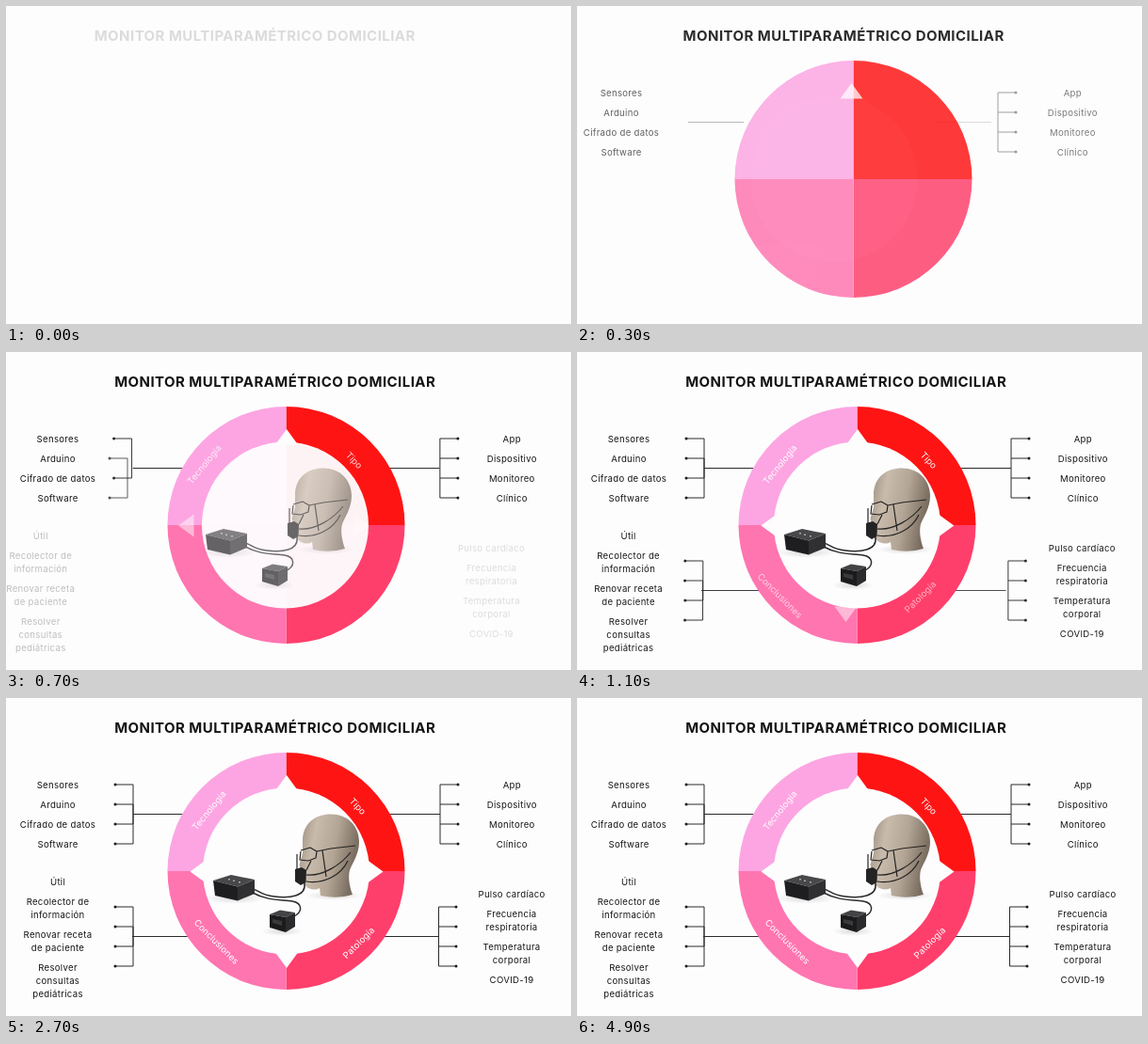
An HTML page that plays this animation: 600 px wide and 338 px high, repeating every 5000 ms.

```html
<!DOCTYPE html>
<html lang="es">
<head>
<meta charset="utf-8">
<title>Monitor multiparamétrico domiciliar</title>
<style>
  html, body { margin: 0; width: 100%; height: 100%; overflow: hidden; background: #fefdfe; }
  svg { display: block; width: 600px; height: 338px; }
  text { font: 9.6px Inter, "Open Sans", sans-serif; letter-spacing: .3px; text-anchor: middle; fill: #161616; }
  .title { font: 700 15px Inter, Roboto, sans-serif; letter-spacing: .44px; fill: #141414; }
  .label { fill: #fff; letter-spacing: .1px; }
  .wire { fill: none; stroke: #2b2b2b; stroke-width: 1; }
  .tube { fill: none; stroke: #2a2a2c; stroke-width: 1.5; stroke-linecap: round; }
  .strap { fill: none; stroke: #242322; stroke-width: 1.2; stroke-linejoin: round; }
  .white { fill: #fefdfe; }
</style>
</head>
<body>
<svg id="stage" viewBox="0 0 600 338">
  <defs>
    <linearGradient id="skin" x1="0" x2="1" y1="0" y2=".25">
      <stop offset="0" stop-color="#968a7b"/>
      <stop offset=".3" stop-color="#c8bbac"/>
      <stop offset=".65" stop-color="#b3a595"/>
      <stop offset="1" stop-color="#796d60"/>
    </linearGradient>
    <radialGradient id="shade">
      <stop offset="0" stop-color="#8a8a8c" stop-opacity=".3"/>
      <stop offset="1" stop-color="#8a8a8c" stop-opacity="0"/>
    </radialGradient>
  </defs>

  <g data-start="-31"><text class="title" x="285.7" y="37">MONITOR MULTIPARAMÉTRICO DOMICILIAR</text></g>

  <g id="wires"></g>

  <g data-start="17">
    <path fill="#ff1414" d="M297.5 184V58A126 126 0 0 1 423.5 184Z"/>
    <path fill="#ff3f6b" d="M297.5 184H423.5A126 126 0 0 1 297.5 310Z"/>
    <path fill="#ff75b0" d="M297.5 184V310A126 126 0 0 1 171.5 184Z"/>
    <path fill="#fca5e2" d="M297.5 184H171.5A126 126 0 0 1 297.5 58Z"/>
  </g>
  <g data-start="295"><circle class="white" cx="297.5" cy="184" r="88.5"/></g>
  <g id="arrows"></g>

  <g data-start="504">
    <ellipse cx="348" cy="210" rx="30" ry="5" fill="url(#shade)"/>
    <ellipse cx="243" cy="213" rx="32" ry="6" fill="url(#shade)"/>
    <ellipse cx="293" cy="248" rx="22" ry="5" fill="url(#shade)"/>
    <path fill="url(#skin)" d="M315 149C317 132 329 123.500 345 123.500C363 123.500 375 136 375 153C375 166 368 175 365 183C363 191 365 201 368 209Q352 214 334 210L333 202Q328 205 321 202C316 199 314 193 314 187L311.500 177L315 165Z"/>
    <path class="tube" d="M317 197C319 211 301 213 285 211S270 205 262 203"/>
    <path class="tube" d="M262 207C278 216 293 214 304 216S316 228 304 233"/>
    <path class="strap" d="M313 162L323 159L330 163L345 160L371 157M313 163L312 172L321 173L329 170L330 163M309 183L309 166M319 183L324 173M319 188C336 190 356 177 366 164M319 195C338 198 356 188 363 173M336 162L340 190"/>
    <path fill="#232323" d="M307 182L314 180L319 183L318.500 196L313 199L307 195Z"/>
    <path fill="#48484a" d="M220 194L239 188L264 193L246 200.500Z"/>
    <path fill="#1e1e20" d="M220 194L246 200.500V215.500L222 210Z"/>
    <path fill="#303032" d="M246 200.500L264 193V208L246 215.500Z"/>
    <path fill="#a9a9ab" d="M236 192h2v1.500h-2zM241 193.500h2v1.500h-2zM247 195h2v1.500h-2z"/>
    <path fill="#434345" d="M280 230L291 225.500L307 228L297 233Z"/>
    <path fill="#1b1b1c" d="M280 230L297 233V249L280 244Z"/>
    <path fill="#2b2b2d" d="M297 233L307 228V243L297 249Z"/>
    <path fill="#3a3a3c" d="M283 235L293 237V242L283 239Z"/>
  </g>

  <g id="texts"></g>
</svg>
<script>
const LOOP = 5000, STEP = 100, ENTER = 620, SHIFT = 25;
const $ = id => document.getElementById(id);
const add = (id, start, body) =>
  $(id).insertAdjacentHTML('beforeend', `<g data-start="${start}">${body}</g>`);

// Connector: a spine joining one or more rows, with a dot at the end of each
function bracket(start, spine, tip, rows) {
  const ends = rows.map(y => `M${spine} ${y}H${tip}`).join('');
  const dots = rows.map(y => `<circle cx="${tip}" cy="${y}" r="1.5" fill="#1c1c1c"/>`).join('');
  add('wires', start,
    `<path class="wire" d="M${spine} ${rows[0]}V${rows[rows.length - 1]}${ends}"/>${dots}`);
}
const line = (start, x1, x2, y) =>
  add('wires', start, `<path class="wire" d="M${x1} ${y}H${x2}"/>`);

bracket(191, 461, 480, [92, 113, 134, 155]);
line(225, 135, 194, 123.5);
line(265, 403, 461, 123.5);
bracket(320, 135, 116, [92, 134]);
bracket(465, 135, 116, [113, 155]);
bracket(705, 135, 116, [222, 264]);
bracket(720, 135, 116, [243, 285]);
bracket(730, 459.5, 478, [222, 243, 264, 285]);
line(750, 134, 200, 253.5);
line(817, 396, 459.5, 253.5);

// Notches in the ring: up, left, right, down
[[76, 0], [572, -90], [605, 90], [972, 180]].forEach(([start, turn]) =>
  add('arrows', start,
    `<path class="white" transform="rotate(${turn} 298 184.500)" d="M286 98.500L298 82L310 98.500Z"/>`));

// Lists: each row is [centre y, text]
function list(start, x, rows) {
  add('texts', start, rows.map(([y, s]) => `<text x="${x}" y="${y + 3.5}">${s}</text>`).join(''));
}
list(104, 55, [[92, 'Sensores'], [113, 'Arduino'], [134, 'Cifrado de datos'], [155, 'Software']]);
list(151, 537.3, [[92, 'App'], [113, 'Dispositivo'], [134, 'Monitoreo'], [155, 'Clínico']]);
list(638, 55, [[195, 'Útil'], [216, 'Recolector de'], [230, 'información'], [251, 'Renovar receta'],
  [265, 'de paciente'], [286, 'Resolver'], [300, 'consultas'], [314, 'pediátricas']]);
list(670, 537, [[208.5, 'Pulso cardíaco'], [229.5, 'Frecuencia'], [243.5, 'respiratoria'],
  [264.5, 'Temperatura'], [278.5, 'corporal'], [299, 'COVID-19']]);

const label = (start, x, y, turn, s) => add('texts', start,
  `<text class="label" transform="translate(${x} ${y}) rotate(${turn})" y="3.5">${s}</text>`);
label(410, 373.5, 115, 47, 'Tipo');
label(443, 215.5, 119.5, -51, 'Tecnología');
label(904, 223.5, 259, 45, 'Conclusiones');
label(937, 374.5, 260, -45, 'Patología');

const parts = [...document.querySelectorAll('[data-start]')]
  .map(el => ({ el, start: +el.dataset.start }));

function draw() {
  const t = Math.floor(performance.now() % LOOP / STEP) * STEP;
  for (const { el, start } of parts) {
    const p = Math.min(1, Math.max(0, (t - start) / ENTER));
    const rest = (1 - p) ** 3;
    el.setAttribute('opacity', 1 - rest);
    el.setAttribute('transform', `translate(${-SHIFT * rest} 0)`);
  }
  requestAnimationFrame(draw);
}
draw();
</script>
</body>
</html>
```
